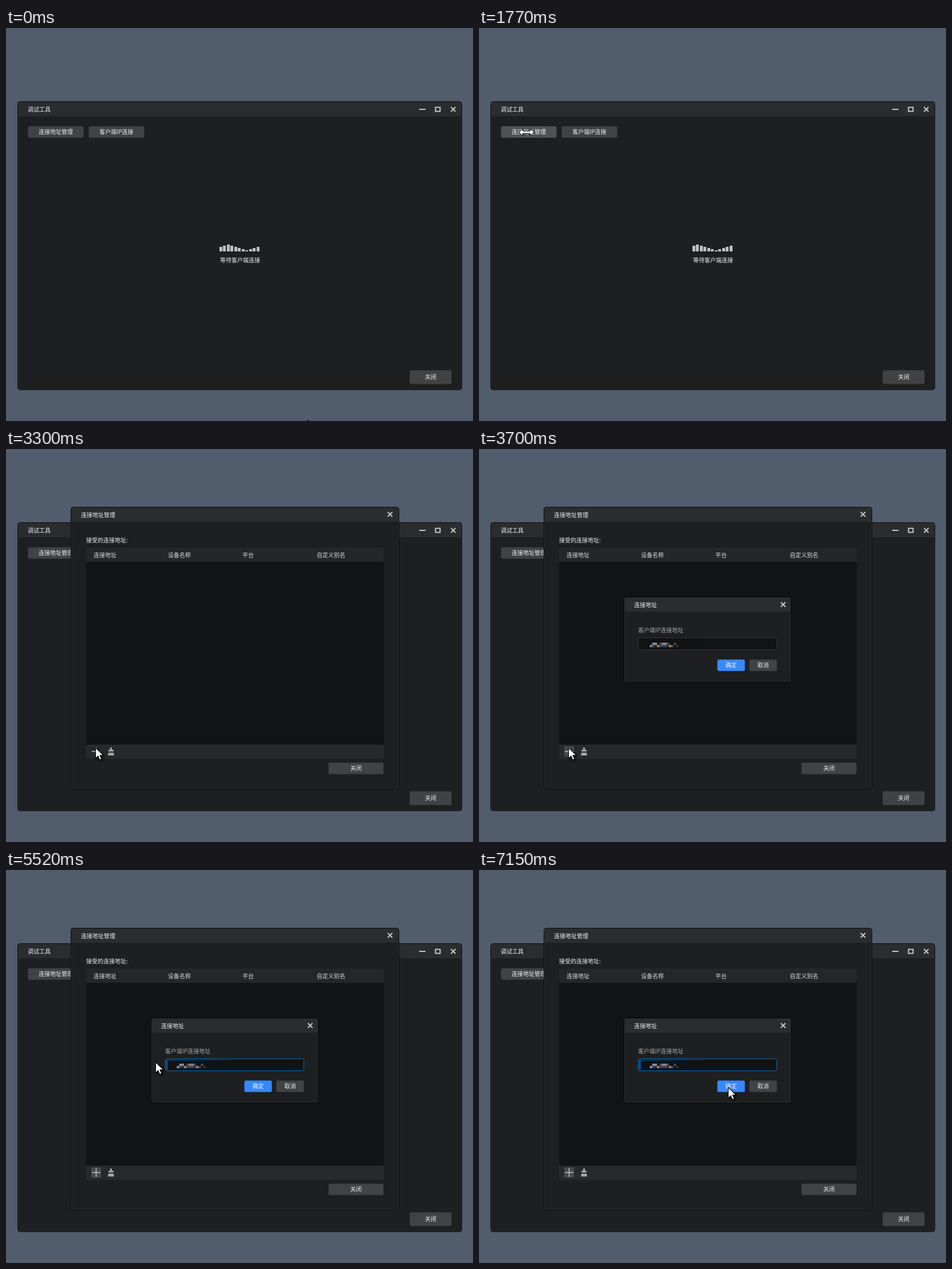
Write an HTML page that moves like this. It is 816x686 px and loops after 8000 ms.

```html
<!DOCTYPE html>
<html lang="zh-CN">
<head>
<meta charset="utf-8">
<title>调试工具</title>
<style>
  html, body { margin: 0; width: 100%; height: 100%; overflow: hidden; background: #515d6c; }
  svg { display: block; width: 816px; height: 686px; }
  text { font: 10px "Noto Sans CJK SC", "Noto Sans CJK", sans-serif; fill: #f0f0f0; }
  .icon { fill: none; stroke: #c6c6c6; stroke-width: 2; }
  #arrow { filter: drop-shadow(2px 2px 1.5px rgba(0, 0, 0, .6)); }
  #arrow, #resize { fill: #fff; stroke: #000; }
</style>
</head>
<body>
<svg id="stage" viewBox="0 0 816 686"></svg>
<script>
const LOOP = 8000;
const TICK = 70;
const stage = document.getElementById('stage');

// Markup helpers
const rect = (x, y, w, h, fill, extra = '') =>
  `<rect x="${x}" y="${y}" width="${w}" height="${h}" fill="${fill}" ${extra}/>`;
const label = (x, middle, text, extra = '') =>
  `<text x="${x}" y="${middle + 3.7}" ${extra}>${text}</text>`;
const button = (x, y, w, h, text, fill = '#414244', id = '') =>
  rect(x + .5, y + .5, w - 1, h - 1, fill, `rx="2.5" ${id && `id="${id}"`}`) +
  label(x + w / 2, y + h / 2, text, 'text-anchor="middle"');
const icon = d => `<path class="icon" d="${d}"/>`;
const cross = (x, y) => icon(`M${x - 4} ${y - 4}l8 8m0-8l-8 8`);
const panel = (x, y, w, h, title) =>
  rect(x + .5, y + .5, w - 1, h - 1, '#1e1f20', 'rx="4" stroke="#060607"') +
  `<path d="M${x + 1} ${y + 26}v-21q0-4 4-4h${w - 10}q4 0 4 4v21z" fill="#2b2c2e"/>` +
  rect(x + 1.5, y + 1.5, w - 3, h - 3, 'none', 'rx="3" stroke="#2f3031"') +
  label(x + 18, y + 14.3, title);

const mainWindow =
  panel(20, 128, 777, 504, '调试工具') +
  icon('M722 142h11M750.5 138.500h8v7h-8z') + cross(781.5, 142) +
  button(38, 171, 98, 21, '连接地址管理', '#414244', 'manageButton') +
  button(144, 171, 98, 21, '客户端IP连接') +
  '<path id="bars" fill="#c0c0c0"/>' +
  label(374, 405, '等待客户端连接') +
  button(705, 597, 74, 25, '关闭');

const manager =
  panel(113, 101, 574, 493, '连接地址管理') + cross(671, 114) +
  label(140, 159, '接受的连接地址:') +
  rect(140, 172, 520, 25, '#252627') +
  rect(140, 197, 520, 319, '#121314') +
  rect(140, 516, 520, 25, '#28292b') +
  ['连接地址', '设备名称', '平台', '自定义别名']
    .map((text, i) => label(153 + 130 * i, 185, text, 'style="fill:#dcdcdc"')).join('') +
  rect(149, 519, 17, 18, '#47484a', 'id="plusHover" rx="1"') +
  '<path class="icon" style="stroke-width:1.5" d="M150 528h15M157.500 520.500v15"/>' +
  '<path fill="#a5a5a2" d="M182 521h3v4h3v3h-9v-3h3zM179 530h9l1 5h-11z"/>' +
  button(563, 547, 97, 21, '关闭');

const prompt =
  panel(253, 258, 293, 149, '连接地址') + cross(531.5, 271.5) +
  label(278, 316, '客户端IP连接地址', 'style="fill:#a6a6a6"') +
  rect(278.5, 329.5, 242, 21, '#121314', 'id="field" rx="3"') +
  `<g id="selection">${rect(279, 331, 4, 18, '#0b4674')}${rect(283, 331, 110, 2, '#0c3a5c')}</g>` +
  button(416, 367, 49, 21, '确定', '#3888ff') +
  button(472, 367, 49, 21, '取消');

// Blurred address: two rows of random tones, above the pointer
const noise = n => Math.abs(Math.sin(n * 12.9898) * 43758.5453) % 1;
const tones = ['#5b4437', '#2b2a2f', '#8e8e98', '#34466b', '#9d8272', '#3d2c28'];
let mosaic = '<path fill="#111213" d="M283 333l111-1v14h-39v4h-72z"/>';
for (let i = 0; i < 28; i++) {
  if (noise(i + 50) < .4) continue;
  const tone = tones[Math.floor(noise(i + 1) * tones.length)];
  mosaic += rect(290 + 4.2 * (i % 14), i < 14 ? 338 : 342, 4.2, 4, tone);
}

const pointer =
  '<g id="pointer"><path id="arrow" transform="scale(1.08)" d="M.5.5v17l4-3.700 2.700 6.200 3-1.300-2.700-6h5.500z"/>' +
  '<path id="resize" d="M-13.500 0l7-6v4h13v-4l7 6-7 6v-4h-13v4z"/></g>';

stage.innerHTML = mainWindow + `<g id="manager">${manager}</g><g id="prompt">${prompt}</g>` +
  pointer + `<g id="mosaic">${mosaic}</g>`;
const el = Object.fromEntries([...stage.querySelectorAll('[id]')].map(node => [node.id, node]));

// Each move bends from the last place, past `via`, to `to`
const home = [527, 684];
const moves = [
  { start: 330, end: 1070, via: [180, 380], to: [23, 319] },
  { start: 1140, end: 1770, via: [20, 200], to: [83, 182] },
  { start: 1840, end: 1910, via: [108, 236], to: [133, 290] },
  { start: 1980, end: 2190, via: [327, 459], to: [366, 444] },
  { start: 2390, end: 3160, via: [240, 70], to: [155, 499] },
  { start: 3230, end: 3300, via: [155, 510], to: [156, 521] },
  { start: 4290, end: 4710, via: [270, 345], to: [362, 342] },
  { start: 5040, end: 5320, via: [310, 341], to: [246, 340] },
  { start: 5520, end: 6270, via: [330, 312], to: [398, 337] },
  { start: 6730, end: 7150, via: [406, 360], to: [435, 379] }
];

function pointerAt(t) {
  const index = moves.findLastIndex(move => move.start <= t);
  if (index < 0) return home;
  const { start, end, via, to } = moves[index];
  const from = index ? moves[index - 1].to : home;
  const step = Math.floor((t - start) / TICK + 1e-6) + 1;
  const u = Math.min(1, step / Math.floor((end - start) / TICK + 1));
  return from.map((v, axis) =>
    Math.round((1 - u) ** 2 * v + 2 * u * (1 - u) * via[axis] + u * u * to[axis]));
}

// A triangle wave runs to the right, one bar every 200 ms
function barsAt(t) {
  const shift = 2 + Math.floor((t + 70) / 200);
  let d = '';
  for (let i = 0; i < 11; i++) {
    const phase = (((i - shift) % 10) + 10) % 10;
    const height = 2 + 2 * Math.abs(phase - 5);
    d += `M${Math.floor(373 + 6.5 * i)} 390v${-height}h5v${height}z`;
  }
  return d;
}

const show = (node, on) => { node.style.display = on ? '' : 'none'; };

function draw(t) {
  const resizing = t >= 1070 && t < 1910;
  const focused = t >= 5110;
  el.bars.setAttribute('d', barsAt(t));
  el.manageButton.setAttribute('fill', t >= 1630 && t < 1840 ? '#505153' : '#414244');
  show(el.manager, t >= 1840);
  show(el.plusHover, t >= 3500);
  show(el.prompt, t >= 3570);
  show(el.mosaic, t >= 3570);
  show(el.selection, focused);
  el.field.setAttribute('stroke', focused ? '#0b6cb5' : '#353638');
  show(el.arrow, !resizing);
  show(el.resize, resizing);
  el.pointer.setAttribute('transform', `translate(${pointerAt(t)})`);
}

const began = performance.now();
function tick() {
  draw((performance.now() - began) % LOOP);
  requestAnimationFrame(tick);
}
tick();
</script>
</body>
</html>
```
